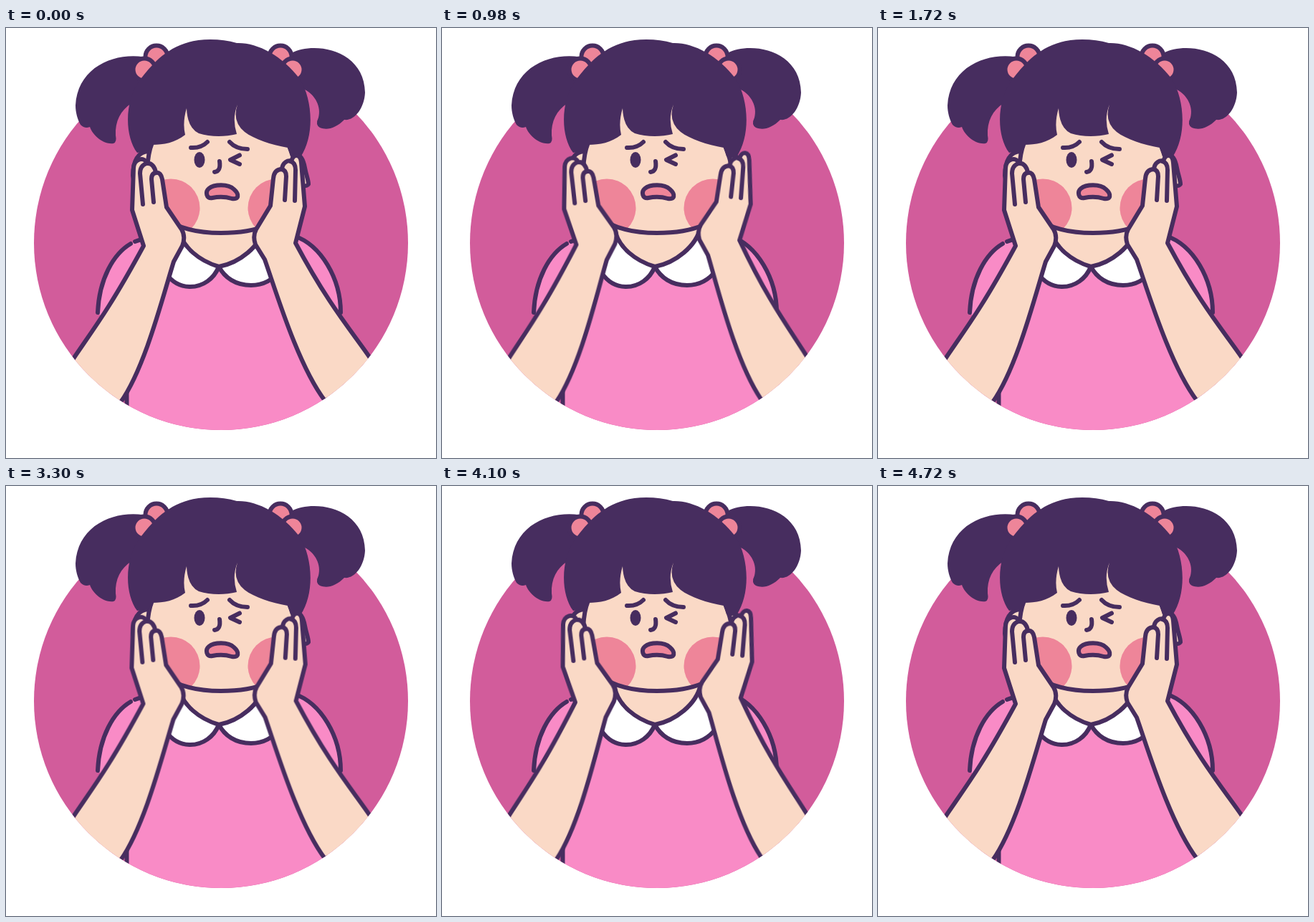
Recreate the animation shown at these times as an HTML page without scripts. Size 600 by 600 pixels, loop 6000 ms.

```html
<!DOCTYPE html>
<html lang="en">
<head>
<meta charset="utf-8">
<title>Worried girl</title>
<style>
  html, body { margin: 0; width: 100%; height: 100%; overflow: hidden; background: #fff; }
  svg { display: block; width: 100vw; height: 100vh; }

  .line { fill: none; }
  .ink { stroke: #472d5f; stroke-width: 6; stroke-linecap: round; stroke-linejoin: round; }
  .hair { fill: #472d5f; }
  .skin { fill: #fad9c6; }
  .blush { fill: #ee8599; }
  .dress { fill: #f98bc6; }

  /* Each arm swings around its elbow, twice per cycle. */
  .arm { animation: swing 3s cubic-bezier(.333, 0, .667, 1) infinite; }
  .left { --out: -16.3deg; --near: 0deg; transform-origin: 110px 527px; }
  .right { --out: 19.1deg; --near: 1.6deg; transform-origin: 487px 522px; }
  @keyframes swing {
    0%, 9.333% { transform: rotate(0deg); }
    22.667%, 45.333% { transform: rotate(var(--out)); }
    34.667% { transform: rotate(var(--near)); }
    57.333%, 100% { transform: rotate(0deg); }
  }
</style>
</head>
<body>
<svg viewBox="0 0 600 600">
  <defs>
    <clipPath id="disc"><circle cx="300" cy="300" r="261"/></clipPath>
    <path id="face" d="M215 95L204 160C196 180 195 212 200 236C210 270 250 286 300 286C350 286 390 272 402 238C409 212 406 190 394 162L380 95Z"/>
    <clipPath id="faceClip"><use href="#face"/></clipPath>
  </defs>

  <circle cx="300" cy="300" r="261" fill="#d25c9b"/>

  <g clip-path="url(#disc)">
    <path class="dress" d="M207 290Q188 293 174 301C150 315 130 350 128 397L170 440V600H444V440L467 397C467 350 440 303 400 290Z"/>
    <g class="line ink">
      <path d="M207 291Q190 294 180 298M174 301C150 315 130 350 128 397"/>
      <path d="M402 290C440 303 467 350 467 397"/>
      <path d="M168.500 479V540M445 490V540"/>
    </g>
  </g>

  <path class="skin" d="M241 270L241 281C248 310 275 325 297 333C325 328 355 305 361 277V260Z"/>
  <g class="ink" fill="#fff">
    <path d="M209 286L241 281C246 306 270 325 297 333C290 350 275 361 257 361C230 361 209 335 209 286Z"/>
    <path d="M361 277L400 284C397 328 376 359 342 359C320 359 305 348 297 333C325 328 355 305 361 277Z"/>
  </g>

  <g class="hair">
    <path d="M205 43C160 30 100 50 97 108C97 118 100 128 104 135Q110 141 117 138C122 152 138 163 150 161Q155 159 153 150C152 130 160 115 175 105L220 60Z"/>
    <path d="M398 35C430 18 500 30 501 90C500 112 486 130 472 128C460 140 448 143 438 139Q431 135 436 125C440 110 432 94 417 86L380 60Z"/>
  </g>
  <g class="ink blush">
    <circle cx="210" cy="40" r="15.500"/>
    <circle cx="193" cy="58" r="15.500"/>
    <circle cx="383" cy="40" r="15.500"/>
    <circle cx="400" cy="58" r="15.500"/>
  </g>

  <g class="ink skin">
    <path d="M200 172C184 172 177 186 177 206Q178 216 186 217L199 218Z"/>
    <path d="M401 179C411 174 415 184 417 195C419 206 422 212 422 218Q420 222 405 220Z"/>
  </g>
  <use href="#face" class="skin"/>
  <g class="blush" clip-path="url(#faceClip)">
    <circle cx="230" cy="251" r="40.500"/>
    <circle cx="378" cy="251" r="40.500"/>
  </g>
  <use href="#face" class="line ink"/>

  <path class="hair" d="M183 174C165 150 165 100 188 71C205 50 230 16 285 16Q305 16 322 21C350 20 385 38 410 71C428 100 431 150 411 180L397 179L393 167C370 163 346 155 333 145Q315 130 323 107Q315 126 322 148C305 152 285 152 269 147Q253 139 252 112Q246 132 250 149C236 160 220 163 204 163L198 172Z"/>

  <g class="line ink">
    <path d="M258 167Q272 168 281 159M312 159Q321 169 337 169"/>
    <path d="M326 177.500L313 184L326 190M298 186Q300 200 291 201"/>
    <path class="blush" d="M288 237C279 239 278 228 283 224C290 218 310 217 318 225C326 232 325 240 315 238Q302 234 288 237Z"/>
  </g>
  <ellipse class="hair" cx="270" cy="184" rx="7.500" ry="11"/>

  <g clip-path="url(#disc)">
    <g class="arm left ink">
      <path class="skin" d="M68 502C110 432 128 422 192 304L176 254L178 195C179 182 193 179 197 189C203 188 208 194 209 202C214 201 217 205 218 211L224 250L245 281Q251 291 246 304L234 326C219 374 194 474 160 522L130 560Z"/>
      <path class="line" d="M191 246L187 203Q187 192 196 189M206 243L203 211Q203 202 210 202"/>
    </g>
    <g class="arm right ink">
      <path class="skin" d="M534 505C506 445 468 420 404 300L417 249L412 188C411 175 401 175 398 186C394 184 386 187 385 197C380 197 374 199 373 210L369 248L349 281Q344 290 348 302L361 323C376 365 407 470 445 520L470 555Z"/>
      <path class="line" d="M389 240L391 207Q391 198 384 197M403 241L404 198Q404 188 397 186"/>
    </g>
  </g>
</svg>
</body>
</html>
```
